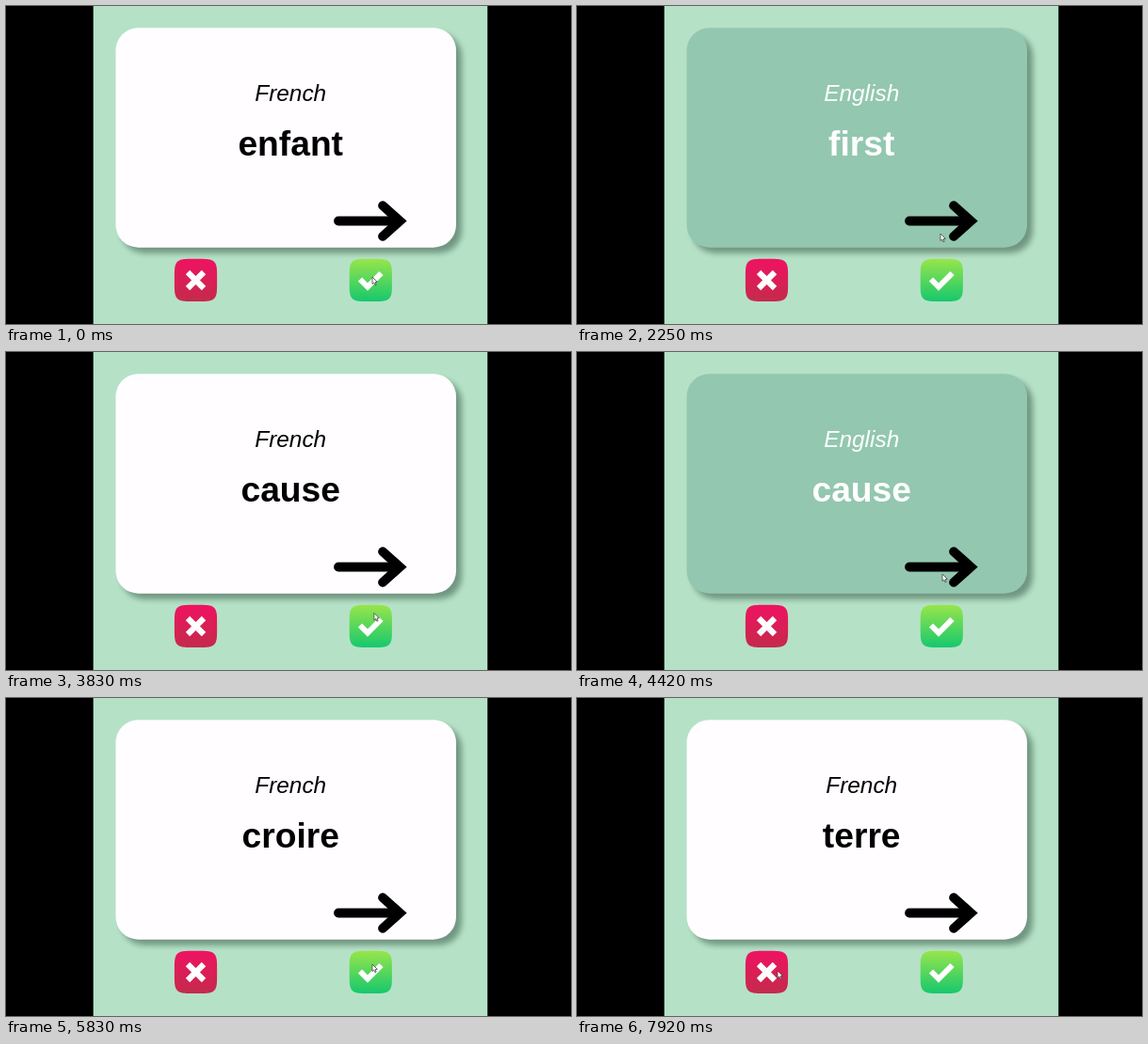
An HTML page with a canvas for the animation above (8 s loop, 600x338 px).

```html
<!DOCTYPE html>
<html lang="en">
<head>
<meta charset="utf-8">
<title>Flash cards</title>
<style>
html, body { margin: 0; width: 100%; height: 100%; overflow: hidden; background: #000; }
canvas { display: block; width: 600px; height: 338px; }
</style>
</head>
<body>
<canvas id="stage" width="600" height="338"></canvas>
<script>
const ctx = document.getElementById('stage').getContext('2d');
const LOOP = 8000, PRESS = 90;
const FONT = '"Liberation Sans", Arial, sans-serif';

// Each round: turn to English, turn back, pick the next word.
const rounds = [
  { fr: 'première', en: 'first', arrow: [386, 242], pick: [391, 279] },
  { fr: 'cause', en: 'cause', arrow: [388, 236], pick: [389, 283] },
  { fr: 'croire', en: 'believe', arrow: [388, 230], pick: [213, 290] }
];
const flipAt = n => 2170 + 2040 * n;
const backAt = n => 3340 + 2000 * n;
const nextAt = n => 1540 + 2050 * n;

const faces = [{ at: 0, word: 'enfant' }];
const glides = [{ from: 1330, to: nextAt(0), spot: [373, 284] }];
const clicks = [];
rounds.forEach((r, n) => {
  const flip = flipAt(n), back = backAt(n);
  faces.push({ at: nextAt(n), word: r.fr }, { at: flip, word: r.en, back: true }, { at: back, word: r.fr });
  glides.push({ from: flip - 420, to: flip - 60, spot: r.arrow }, { from: back, to: nextAt(n + 1), spot: r.pick });
  clicks.push(flip, back);
});
faces.push({ at: nextAt(rounds.length), word: 'terre' });

function pointerAt(t) {
  let [x, y] = [389, 288];
  for (const { from, to, spot } of glides) {
    const p = Math.min(1, Math.max(0, (t - from) / (to - from)));
    const e = p * p * (3 - 2 * p);
    x += (spot[0] - x) * e;
    y += (spot[1] - y) * e;
  }
  return [x, y];
}

function line(points, width, color) {
  ctx.strokeStyle = color;
  ctx.lineWidth = width;
  ctx.beginPath();
  points.forEach(([x, y]) => ctx.lineTo(x, y));
  ctx.stroke();
}

function text(str, y, font, color) {
  ctx.font = font + ' ' + FONT;
  ctx.fillStyle = color;
  ctx.textAlign = 'center';
  ctx.fillText(str, 302.2, y);
}

function drawCard({ word, back }) {
  const ink = back ? '#fff' : '#000';
  ctx.save();
  ctx.shadowColor = 'rgba(55, 85, 70, 0.55)';
  ctx.shadowBlur = 6;
  ctx.shadowOffsetX = ctx.shadowOffsetY = 6;
  ctx.fillStyle = back ? '#93c7b0' : '#fffdff';
  ctx.beginPath();
  ctx.roundRect(116.5, 23.2, 361.5, 233.5, 24);
  ctx.fill();
  ctx.restore();
  text(back ? 'English' : 'French', 101.3, 'italic 24.4px', ink);
  text(word, 159.1, 'bold 37.2px', ink);
}

function drawArrow(pressed) {
  if (pressed) {
    ctx.fillStyle = '#ececec';
    ctx.fillRect(348, 207.5, 78, 42);
  }
  ctx.lineCap = 'round';
  line([[353, 228.5], [416, 228.5]], 9.8, '#000');
  line([[400, 212.2], [418.3, 228.5], [400, 244.8]], 9.8, '#000');
}

// Superellipse tile with a vertical gradient
function button(cx, top, bottom) {
  const cy = 291.4, r = 22.6;
  const bend = v => Math.sign(v) * Math.abs(v) ** 0.42;
  const g = ctx.createLinearGradient(0, cy - r, 0, cy + r);
  g.addColorStop(0, top);
  g.addColorStop(1, bottom);
  ctx.fillStyle = g;
  ctx.beginPath();
  for (let a = 0; a < 2 * Math.PI; a += 0.02) {
    ctx.lineTo(cx + r * bend(Math.cos(a)), cy + r * bend(Math.sin(a)));
  }
  ctx.fill();
}

function drawButtons() {
  ctx.lineCap = 'butt';
  button(201.5, '#f01262', '#c42b4b');
  line([[193, 283], [210, 300]], 6.2, '#fff');
  line([[210, 283], [193, 300]], 6.2, '#fff');
  button(387.3, '#98e54b', '#16c86d');
  line([[376, 290.5], [384, 298.5], [398.5, 284]], 6, '#fff');
}

function drawPointer(t) {
  ctx.save();
  ctx.translate(...pointerAt(t));
  ctx.beginPath();
  [[0, 0], [0, 7.5], [1.8, 6], [3, 8.8], [4.2, 8.2], [3.1, 5.5], [5.4, 5.4]]
    .forEach(([x, y]) => ctx.lineTo(x, y));
  ctx.closePath();
  ctx.fillStyle = '#fff';
  ctx.fill();
  ctx.lineWidth = 0.8;
  ctx.strokeStyle = '#444';
  ctx.stroke();
  ctx.restore();
}

function draw(t) {
  ctx.fillStyle = '#000';
  ctx.fillRect(0, 0, 600, 338);
  ctx.fillStyle = '#b5e2c7';
  ctx.fillRect(92.7, 0, 418.6, 338);
  drawCard(faces.filter(f => f.at <= t).pop());
  drawArrow(clicks.some(c => t >= c - PRESS && t < c));
  drawButtons();
  drawPointer(t);
}

const start = performance.now();
function tick() {
  draw((performance.now() - start) % LOOP);
  requestAnimationFrame(tick);
}
tick();
</script>
</body>
</html>
```
